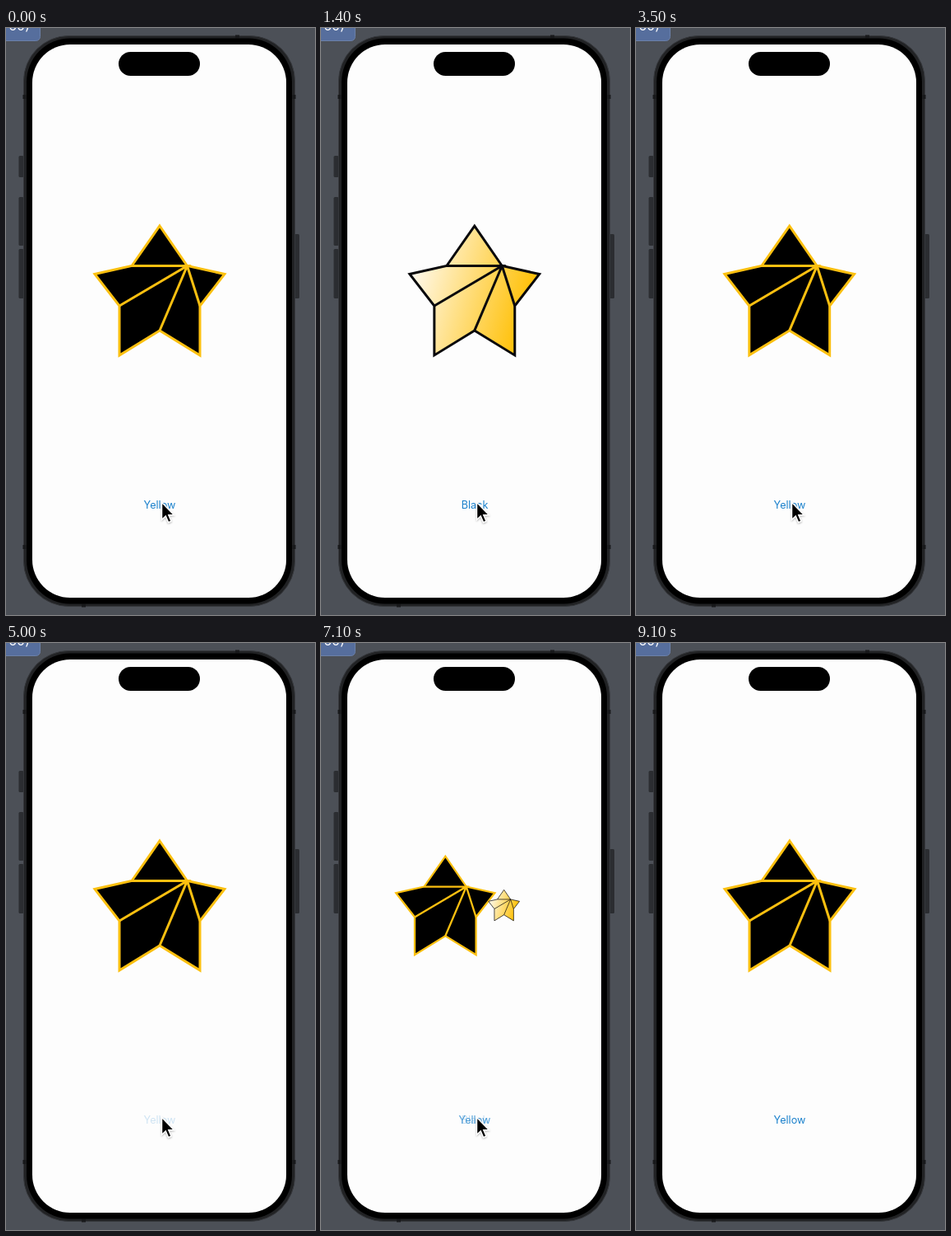
Write an HTML page that moves like this. It is 376 by 712 pixels and loops after 9700 ms.

```html
<!DOCTYPE html>
<html lang="en">
<head>
<meta charset="utf-8">
<title>Star toggle</title>
<style>
  html, body { margin: 0; width: 100%; height: 100%; overflow: hidden; background: #4c5057; }
  svg { display: block; }
  text { font-family: Inter, Roboto, sans-serif; }
  .label { font-size: 12.7px; fill: #1a80cc; text-anchor: middle; }
</style>
</head>
<body>
<svg width="376" height="712" viewBox="0 0 376 712">
  <defs>
    <linearGradient id="gold" gradientUnits="userSpaceOnUse" x1="-79" y1="-18" x2="60" y2="21">
      <stop offset="0" stop-color="#fffaf0"/>
      <stop offset="1" stop-color="#ffc20e"/>
    </linearGradient>
    <filter id="shadow" x="-50%" y="-50%" width="200%" height="200%">
      <feDropShadow dx="0" dy="1" stdDeviation="1" flood-opacity=".35"/>
    </filter>
    <g id="star" stroke-width="3" stroke-miterlimit="10">
      <path d="M0-78L33.5-29.5L79-19.5L49 19V79L0 49L-49 79V19L-79-19.5L-34-29.5Z"/>
      <path fill="none" d="M-34-29.5H33.5L-49 19M33.5-29.5L0 49M33.5-29.5L49 19"/>
    </g>
  </defs>

  <rect width="376" height="712" fill="#4c5057"/>

  <!-- Phone -->
  <g fill="#2b2d31">
    <rect x="15.5" y="155" width="6" height="26" rx="1.5"/>
    <rect x="15.5" y="205" width="6" height="59" rx="1.5"/>
    <rect x="15.5" y="268" width="6" height="60" rx="1.5"/>
    <rect x="351" y="250" width="6" height="78" rx="1.5"/>
  </g>
  <rect x="21.5" y="9.5" width="330" height="692" rx="55" fill="#212224" stroke="#35373b"/>
  <path stroke="#18191b" stroke-width="4" d="M279 10.5h5M92 700.5h5M22.5 81v5M22.5 627v5M350.5 81v5M350.5 627v5"/>
  <rect x="25" y="12.5" width="323" height="686" rx="53"/>
  <rect x="32" y="20" width="309" height="671" rx="46" fill="#fdfdfd"/>
  <rect x="137" y="29" width="99" height="29" rx="14.5"/>

  <!-- Clipped window caption -->
  <rect x="-10" y="-10" width="51.5" height="25.5" rx="5" fill="#566e9d" stroke="#6b80a9"/>
  <text x="29" y="3" font-size="16" fill="#fff" text-anchor="end">60)</text>

  <g id="stars">
    <use id="black" href="#star" fill="#000" stroke="#fcc010"/>
    <use id="yellow" href="#star" fill="url(#gold)" stroke="#08080c"/>
  </g>
  <text id="blackLabel" class="label" x="187" y="582.5">Yellow</text>
  <text id="yellowLabel" class="label" x="187" y="582.5">Black</text>

  <path id="cursor" filter="url(#shadow)" stroke="#fff" stroke-width="1.3"
    d="M189.6 575.5V596.2L194.3 591.8L197.6 599.6L201 598.2L197.7 590.6H204.2Z"/>
</svg>
<script>
const LOOP = 9700, CURSOR_END = 8900;
const taps = [
  { down: 500, up: 580 },
  { down: 2600, up: 2715 },
  { down: 5000, up: 5050 },
  { down: 6860, up: 6860 }
];
const CENTER = { x: 187, y: 318 }, SHIFT = 196;
const OMEGA = 2 * Math.PI / 0.55;
const el = id => document.getElementById(id);
const names = ['black', 'yellow'];

// Critically damped spring from 0 to 1
const spring = ms => {
  const x = OMEGA * ms / 1000;
  return 1 - (1 + x) * Math.exp(-x);
};

// The offset is itself scaled, so the path bows out sideways
function place(name, scale, side, pressed) {
  const x = CENTER.x + side * SHIFT * scale * (1 - scale);
  el(name).setAttribute('transform', `translate(${x} ${CENTER.y}) scale(${scale})`);
  el(name).style.display = scale > 0.002 ? '' : 'none';
  el(name + 'Label').style.opacity = scale * (pressed ? 0.2 : 1);
}

function draw(now) {
  const t = now % LOOP;
  const done = taps.filter(tap => t >= tap.up);
  const p = done.length ? spring(t - done[done.length - 1].up) : 1;
  const pressed = taps.some(tap => t >= tap.down && t < tap.up);
  const current = done.length % 2;
  place(names[current], p, -1, pressed);
  place(names[1 - current], 1 - p, 1, pressed);
  el('cursor').style.display = t < CURSOR_END ? '' : 'none';
}

const start = performance.now();
function tick() {
  draw(performance.now() - start);
  requestAnimationFrame(tick);
}
tick();
</script>
</body>
</html>
```
